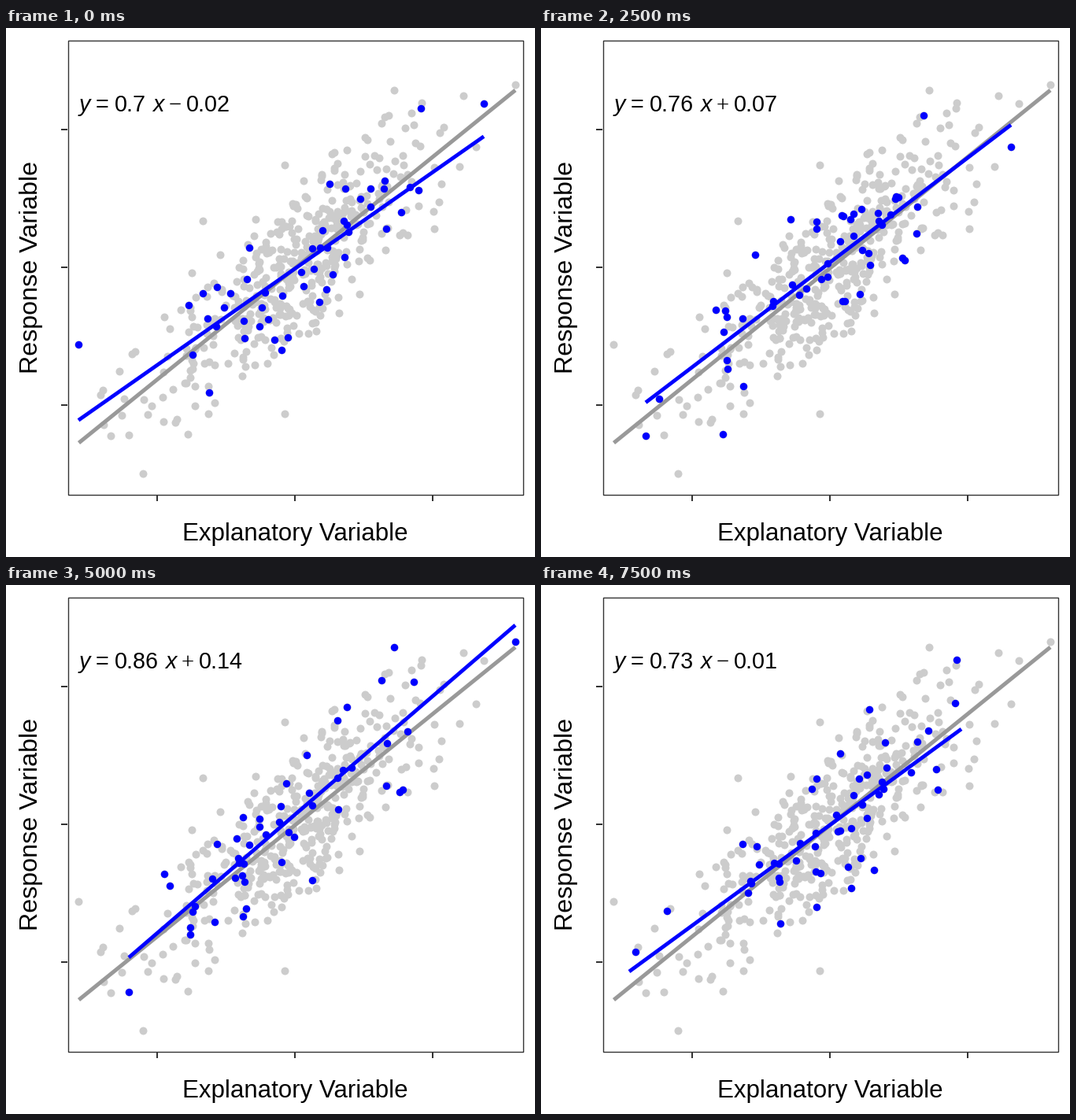
Animation of 672 by 672 pixels, one loop 8000 ms. Source, as a matplotlib script:

```python
import numpy as np
import matplotlib.pyplot as plt
from matplotlib.animation import FuncAnimation
from matplotlib.patches import Rectangle

SIZE, DPI = 672, 96
PX = 72 / DPI               # points per pixel
X0, Y0, UNIT = 367, 304, 87.5
EM, BASE = 28.8, 106        # equation font size and baseline
DARK, CLOUD, TREND, BLUE = "#333333", "#cccccc", "#999999", "#0000ff"
COUNT, SAMPLE = 490, 49

# Slope, intercept and horizontal reach of each fitted line
FITS = [
    (0.70, -0.02, 92, 607), (0.83, 0.06, 160, 647),
    (0.80, -0.09, 144, 581), (0.99, 0.04, 120, 607),
    (0.84, -0.05, 133, 558), (0.76, 0.07, 133, 597),
    (0.94, -0.03, 133, 537), (0.89, 0.02, 151, 550),
    (1.00, 0.14, 144, 607), (0.83, 0.18, 120, 523),
    (0.86, 0.14, 156, 647), (0.82, 0.07, 167, 550),
    (0.62, 0.12, 200, 597), (0.78, -0.04, 167, 537),
    (0.81, 0.05, 156, 597), (0.73, -0.01, 112, 534),
]

# The most striking outliers of the population
OUTLIERS = np.array([
    (92, 402), (120, 466), (133, 518), (144, 436), (156, 517), (174, 566),
    (200, 500), (250, 245), (354, 174), (354, 490), (493, 79), (550, 221),
    (581, 86), (597, 151), (607, 96), (647, 72),
], float)


def line_y(x, slope, icpt):
    return Y0 - slope * (x - X0) - UNIT * icpt


def make_population():
    """Correlated normal cloud around the trend, plus the outliers."""
    rng = np.random.default_rng(11)
    x = rng.normal(X0, UNIT, 2 * COUNT)
    noise = rng.normal(0, 0.6 * UNIT, 2 * COUNT)
    y = line_y(x, 0.807, 0) + noise
    keep = (x > 105) & (x < 600) & (y > 85) & (y < 545) & (abs(noise) < 108)
    cloud = np.column_stack([x, y])[keep]
    return np.vstack([OUTLIERS, cloud])[:COUNT]


def pick_sample(seed, slope, icpt, lo, hi, tries=250):
    """Random sample whose least-squares line lies closest to the given one."""
    rng = np.random.default_rng(seed)
    x = population[:, 0]
    ends = [abs(x - lo).argmin(), abs(x - hi).argmin()]
    pool = np.setdiff1d(np.flatnonzero((x > lo) & (x < hi)), ends)

    def error(pts):
        b, a = np.polyfit(pts[:, 0] - X0, Y0 - pts[:, 1], 1)
        return abs(b - slope) + abs(a / UNIT - icpt)

    draws = (population[np.r_[ends, rng.choice(pool, SAMPLE - 2, replace=False)]]
             for _ in range(tries))
    return min(draws, key=error)


population = make_population()
samples = [pick_sample(i, *fit) for i, fit in enumerate(FITS)]

fig = plt.figure(figsize=(SIZE / DPI, SIZE / DPI), dpi=DPI, facecolor="white")
ax = fig.add_axes([0, 0, 1, 1])
ax.set_xlim(0, SIZE)
ax.set_ylim(SIZE, 0)
ax.axis("off")


def text(x, y, s="", size=EM, font="Liberation Sans", **kw):
    return ax.text(x, y, s, fontsize=size * PX, family=font, color="black", **kw)


def stroke(x, y, color, width, z):
    return ax.plot(x, y, color=color, lw=width * PX, zorder=z,
                   solid_capstyle="butt")[0]


def dots(pts, color, size, z):
    return ax.plot(*pts.T, "o", color=color, ms=size * PX, mew=0, zorder=z)[0]


# Panel and axes
ax.add_patch(Rectangle((78.5, 15.5), 578, 577, fill=False, ec=DARK,
                       lw=1.4 * PX, zorder=6))
for k in (-2, 0, 2):
    tx, ty = X0 + k * UNIT, Y0 + k * UNIT
    stroke([tx, tx], [593, 601], DARK, 2, 6)
    stroke([70, 78], [ty, ty], DARK, 2, 6)
text(X0, 651, "Explanatory Variable", 31.2, ha="center")
text(40, Y0, "Response Variable", 32.2, ha="center", rotation=90,
     rotation_mode="anchor")

# Population, sample and their lines
dots(population, CLOUD, 10, 1)
stroke([92.5, 647], [527, 79], TREND, 5, 2)
blue_dots = dots(samples[0], BLUE, 9.4, 3)
blue_line = stroke([], [], BLUE, 4.8, 4)

# Equation
text(93, BASE, "y", style="italic")
text(113.5, BASE, "=")
slope_txt = text(138, BASE)
x_txt = text(0, BASE, "x", style="italic")
sign_txt = text(0, BASE, font="Liberation Serif")
icpt_txt = text(0, BASE)


def number(v):
    return f"{abs(v):.2f}".rstrip("0").rstrip(".")


def advance(s):
    return EM * (0.556 * len(s) - 0.278 * s.count("."))


def update(i):
    slope, icpt, lo, hi = FITS[i]
    blue_dots.set_data(*samples[i].T)
    reach = np.array([lo, hi])
    blue_line.set_data(reach, line_y(reach, slope, icpt))
    s = number(slope)
    x = 138 + advance(s) + 0.278 * EM
    slope_txt.set_text(s)
    x_txt.set_x(x)
    sign_txt.set_x(x + 0.73 * EM)
    sign_txt.set_text("+" if icpt >= 0 else "\u2212")
    icpt_txt.set_x(x + 1.5 * EM)
    icpt_txt.set_text(number(icpt))
    return blue_dots, blue_line, slope_txt, x_txt, sign_txt, icpt_txt


anim = FuncAnimation(fig, update, frames=len(FITS), interval=500,
                     repeat=True, repeat_delay=0)
plt.show()
```
